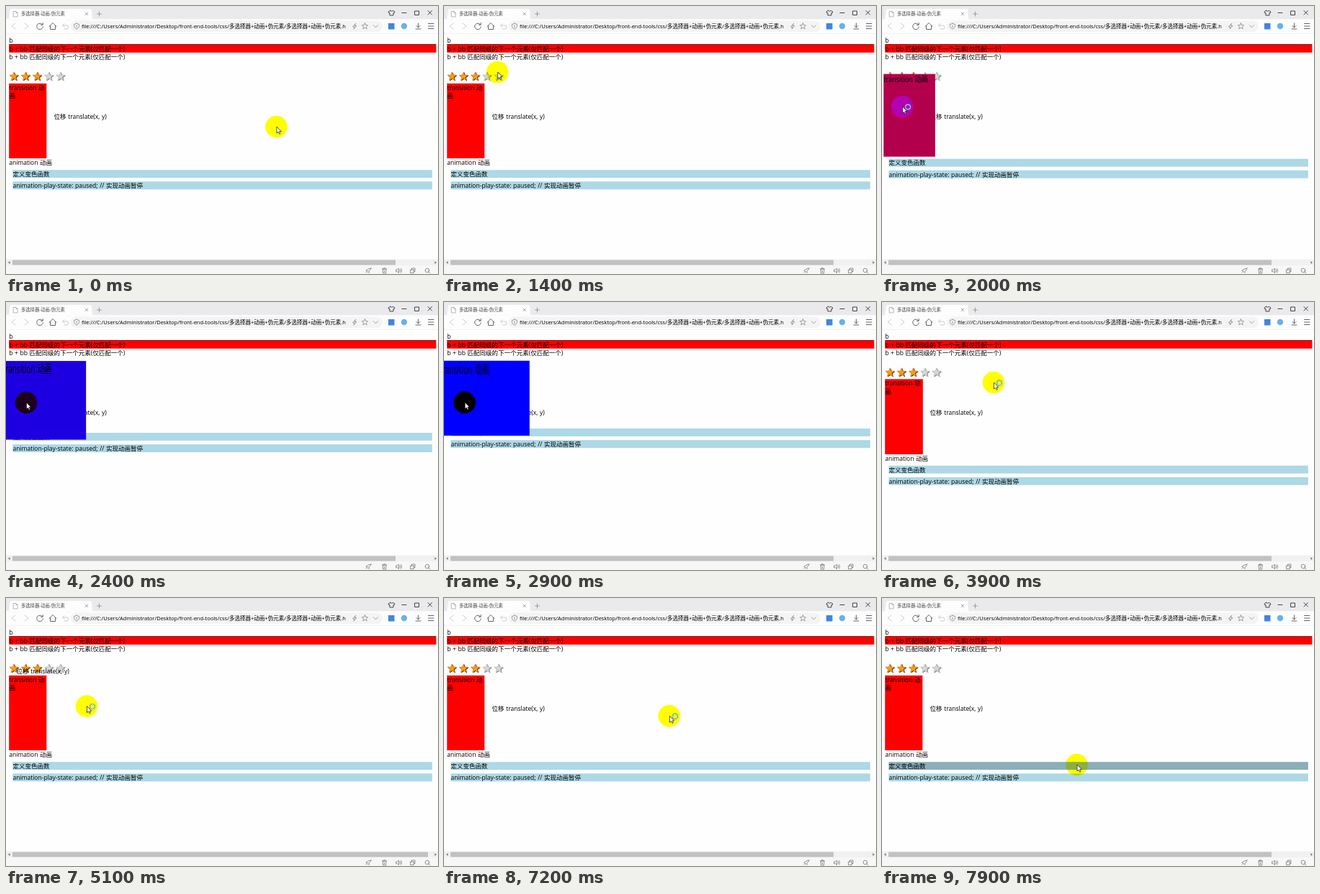
Write an HTML page that moves like this. It is 600x373 px and loops after 8000 ms.

```html
<!DOCTYPE html>
<html lang="zh">
<head>
<meta charset="utf-8">
<style>
html, body { margin: 0; width: 100%; height: 100%; overflow: hidden; background: #fff; }
svg { display: block; width: 600px; height: 373px; isolation: isolate; }
text { font: 8.52px "Open Sans", "Noto Sans CJK SC", "Noto Sans CJK", sans-serif; word-spacing: .4px; white-space: pre; }
.icon { fill: none; stroke: #555; stroke-width: .9; stroke-linecap: round; stroke-linejoin: round; }
.thin { stroke: #666; stroke-width: .7; }
.pale { stroke: #c8c8c8; }
.spot { fill: #00f; mix-blend-mode: difference; }
</style>
</head>
<body>
<svg viewBox="0 0 600 373">
  <rect width="600" height="373" fill="#fefefe"/>

  <!-- page -->
  <text x="4.2" y="51">b</text>
  <rect x="4.2" y="53.6" width="593.2" height="11.2" fill="#f00"/>
  <path d="M4.2 53.5H597.4" stroke="#400" stroke-width=".8"/>
  <text x="4.2" y="62.6">b + bb 匹配同级的下一个元素(仅匹配一个)</text>
  <text x="4.2" y="74">b + bb 匹配同级的下一个元素(仅匹配一个)</text>
  <g id="stars"></g>
  <text id="shift" x="66.6" y="157.3">位移 translate(x, y)</text>
  <g id="below">
    <text x="4.2" y="221">animation 动画</text>
    <rect id="bar" x="9.3" y="228.2" width="582.6" height="10.9" fill="#add8e6"/>
    <text x="9.4" y="237">定义变色函数</text>
    <rect x="9.3" y="244.3" width="582.6" height="10.9" fill="#add8e6"/>
    <text x="9.4" y="253.2">animation-play-state: paused; // 实现动画暂停</text>
  </g>
  <g id="box">
    <rect id="fill" x="4.2" y="107.8"/>
    <text id="line1" x="4.4" y="116.8"></text>
    <text id="line2" x="4.4" y="128">画</text>
  </g>

  <!-- window frame -->
  <rect width="600" height="18.5" fill="#eaeaec"/>
  <path d="M4 18.5L6 5Q6 4 8 4H117Q119 4 119 6L120 18.5Z" fill="#fdfdfd"/>
  <rect y="18.5" width="600" height="20" fill="#fdfdfd"/>
  <rect x="90" y="20.5" width="433" height="15.5" rx="7.7" fill="#f4f4f5"/>
  <path d="M0 38.5H600" stroke="#f1f1f1"/>
  <text x="21" y="13.4" fill="#444" style="font-size:6.3px">多选择器-动画-伪元素</text>
  <text x="105" y="30.8" style="font-size:7.53px">file:///C:/Users/Administrator/Desktop/front-end-tools/css/多选择器+动画+伪元素/多选择器+动画+伪元素.h</text>
  <g class="icon">
    <path d="M10.5 7.5H14L16 9.5V15H10.5ZM14 7.5V9.5H16" stroke="#999" stroke-width=".7"/>
    <path d="M110 9l3.6 3.6m0-3.6l-3.6 3.6M126.500 11h6m-3-3v6" stroke="#888" stroke-width=".8"/>
    <path class="pale" d="M13 24l-5 4 5 4M26 24l5 4-5 4M79 27h5.500a2.500 2.500 0 0 1 0 5H81M81 24.500l-2.500 2.500 2.500 2.500"/>
    <path d="M50.600 26A4.300 4.300 0 1 0 51.300 29M51.200 23.500V26.300H48.400"/>
    <path d="M60 28.500L65 23.500L70 28.500M61.500 27.500V32.500H68.500V27.500"/>
    <path d="M98 24.200Q100 25.500 101.600 25.400Q102 30.500 98 32.200Q94 30.500 94.400 25.400Q96 25.500 98 24.200ZM98 27v2.700" stroke="#888" stroke-width=".8"/>
    <path d="M485.500 24.500L481.500 29H484L483 32L487 27.500H484.500Z" stroke="#888" stroke-width=".8"/>
    <path d="M498.500 23.800l1.200 2.800 3 .2-2.300 2 .8 3-2.700-1.700-2.700 1.700.8-3-2.300-2 3-.2zM510.500 26.800l3 3 3-3" stroke="#888" stroke-width=".8"/>
    <path d="M572.500 24v6m-2.500-2.500l2.500 2.500 2.500-2.500M569 32h7M586.500 24.500h7.500m-7.500 3.500h7.500m-7.500 3.500h7.500"/>
    <path d="M533.500 6.500l-2.500 1.500 1 2 1-.5V13H538V9.500l1 .5 1-2-2.500-1.500Q535.500 8 533.500 6.500ZM550 9.500h6M568 7h5.500v5.500H568ZM586 6.500l5.500 5.500m0-5.500l-5.500 5.500" stroke="#333"/>
  </g>
  <rect x="531" y="24" width="8.500" height="8.500" fill="#4285e0"/>
  <circle cx="553" cy="28" r="4.200" fill="#65b3ec"/>

  <!-- scroll and status bars -->
  <rect y="352.500" width="600" height="9" fill="#f1f1f1"/>
  <rect id="thumb" x="9" y="353.500" height="7" fill="#c1c1c1"/>
  <path d="M5.500 355v4l-2.500-2zM595.500 355v4l2.500-2z" fill="#777"/>
  <rect y="361.500" width="600" height="11.500" fill="#f7f7f8"/>
  <g class="icon thin">
    <path d="M507 365l-4 1-2.500 2.500 2 2 2.500-2 2-3.500M500 371l2-2M501 367.500l-1 .5M504.500 370.500l-.5 1"/>
    <path d="M522.500 366h6M524.500 366v-1.300h2V366M523.200 366l.4 6h4l.4-6M525.500 368v2.500"/>
    <path d="M542 367h1.500l2-1.800v6.300l-2-1.800H542ZM547.300 366.700q1 1.600 0 3.300M548.800 365.500q2 2.800 0 5.700"/>
    <path d="M562 367h4.500v4.500H562ZM563.500 367v-2H568v4.500h-1.500"/>
    <path d="M587 370l2 2"/><circle cx="585" cy="368" r="2.800"/>
  </g>

  <circle id="spot" class="spot" r="15.300"/>
  <g id="pointer">
    <path d="M.5 0V9L2.600 7.200L4.100 10.200L5.500 9.500L4.100 6.600H6.800Z" fill="#fff" stroke="#111" stroke-width=".7"/>
    <g id="busy" fill="none">
      <circle cx="8" cy=".5" r="3.500" stroke="#4a8298" stroke-width="1.700"/>
      <circle cx="8" cy=".5" r="3.500" stroke="#b4e0ee" stroke-width="1"/>
    </g>
  </g>
</svg>
<script>
const $ = id => document.getElementById(id);
const set = (id, attrs) => { for (const k in attrs) $(id).setAttribute(k, attrs[k]); };
const within = (t, a, b) => t >= a && t < b;

// five rating stars, three lit
const starPoints = (cx, cy, r) => Array.from({ length: 10 }, (_, i) => {
  const a = (i / 5 - .5) * Math.PI, d = i % 2 ? r * .42 : r;
  return (cx + d * Math.cos(a)).toFixed(2) + ',' + (cy + d * Math.sin(a)).toFixed(2);
}).join(' ');
$('stars').innerHTML = [0, 1, 2, 3, 4].map(i => {
  const x = 11 + i * 16.2, lit = i < 3;
  return `<polygon points="${starPoints(x + .9, 98.9, 6.8)}" fill="${lit ? '#3a2a18' : '#777'}"/>
    <polygon points="${starPoints(x, 98.2, 6.5)}" fill="${lit ? '#ff9a10' : '#d6d6d6'}" stroke="${lit ? '#b56a10' : '#aaa'}" stroke-width=".5"/>`;
}).join('');

// CSS "ease": cubic-bezier(.25, .1, .25, 1)
function ease(x) {
  if (x <= 0) return 0;
  if (x >= 1) return 1;
  const curve = (a, b, s) => 3 * a * s * (1 - s) ** 2 + 3 * b * s * s * (1 - s) + s ** 3;
  let lo = 0, hi = 1;
  for (let i = 0; i < 24; i++) {
    const mid = (lo + hi) / 2;
    curve(.25, .25, mid) < x ? lo = mid : hi = mid;
  }
  return curve(.1, 1, lo);
}

// pointer path: time, x, y
const path = [
  [0, 375.5, 168], [20, 375.5, 168], [100, 300, 112], [200, 150, 76], [300, 77, 89],
  [1350, 77, 89], [1800, 52, 116], [1950, 28, 140], [2900, 28, 140], [3050, 125, 97],
  [3300, 157.5, 99], [3900, 155, 112], [4700, 112, 150.5], [5100, 112, 150.5],
  [5500, 106, 155], [5750, 106, 155], [6100, 111, 152], [6750, 111, 152],
  [7200, 313, 164], [7600, 278, 225], [7900, 270.5, 232], [8000, 270.5, 232]
];
function pointerAt(t) {
  const i = path.findIndex(p => p[0] > t);
  const [t0, x0, y0] = path[i - 1], [t1, x1, y1] = path[i];
  const k = (t - t0) / (t1 - t0);
  return [x0 + (x1 - x0) * k, y0 + (y1 - y0) * k];
}

function draw(t) {
  const [x, y] = pointerAt(t);
  set('spot', { cx: x, cy: y });
  set('pointer', { transform: `translate(${x} ${y})` });
  set('busy', { visibility: within(t, 1800, 2300) || within(t, 3100, 7600) ? 'visible' : 'hidden' });

  // hover transition: 100x200 red to 200x100 blue, scale(1.2, 2)
  const p = ease((t - 1800) / 1000) - ease((t - 3025) / 1000);
  const w = 52.1 + 52.1 * p, h = 104.2 - 52.1 * p, cx = 4.2 + w / 2, cy = 107.8 + h / 2;
  set('box', { transform: `translate(${cx} ${cy}) scale(${1 + .2 * p} ${1 + p}) translate(${-cx} ${-cy})` });
  set('fill', { width: w, height: h, fill: `rgb(${255 * (1 - p)},0,${255 * p})` });
  const wrapped = w < 60;
  $('line1').textContent = wrapped ? 'transition 动' : 'transition 动画';
  set('line2', { visibility: wrapped ? 'visible' : 'hidden' });
  set('below', { transform: `translate(0 ${-52.1 * p})` });

  // the hovered line moves away, so the page overflows less and the thumb grows
  const moved = within(t, 4600, 5500) || within(t, 5900, 6850);
  set('shift', { transform: moved ? 'translate(-52 -52)' : '' });
  set('thumb', { width: moved ? 577 : 532 });

  const dim = 1 - ease((t - 7730) / 1000) * .85;
  set('bar', { fill: `rgb(${173 * dim},${216 * dim},${230 * dim})` });
}

function tick() {
  draw(performance.now() % 8000);
  requestAnimationFrame(tick);
}
tick();
</script>
</body>
</html>
```
